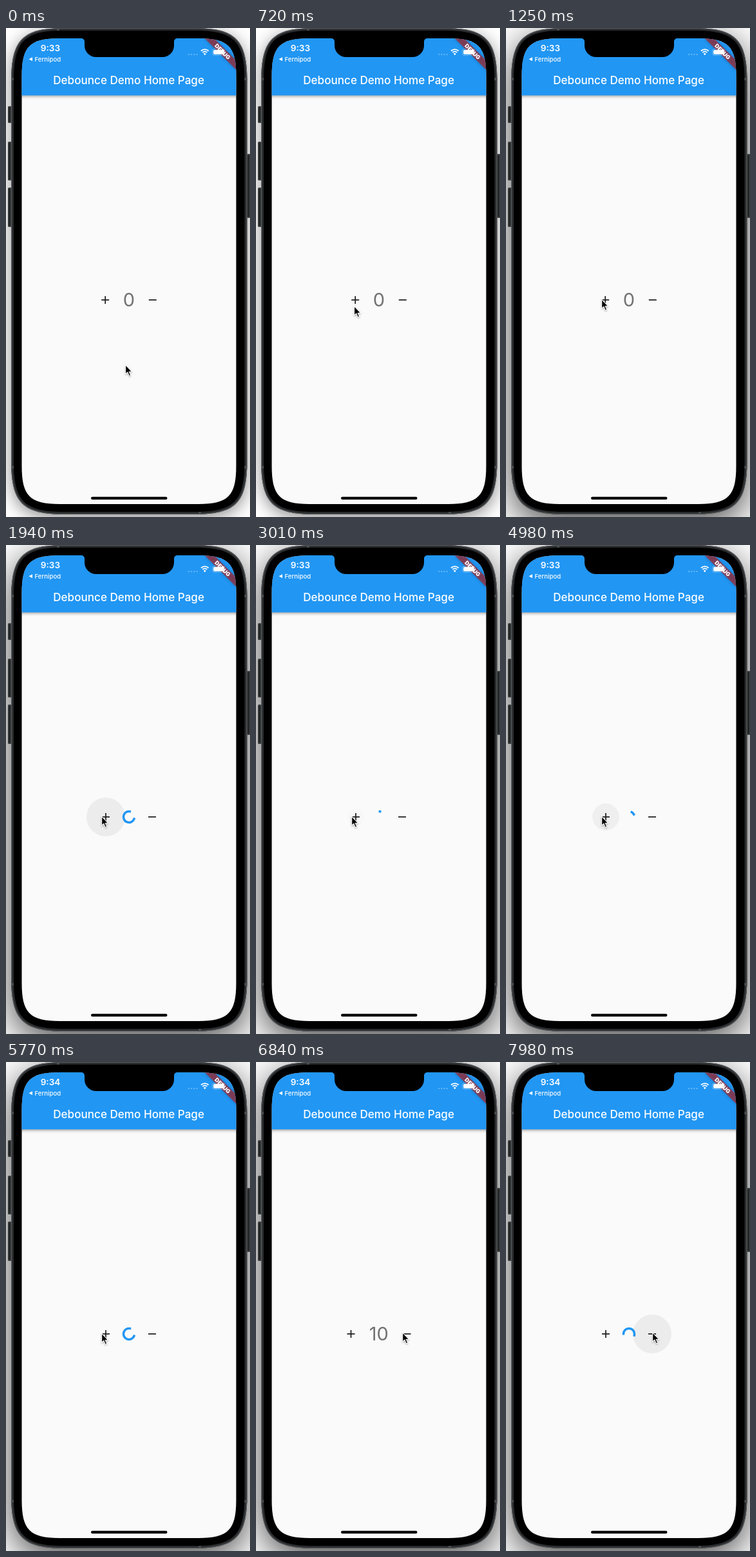
These frames come from a looping animation (379 px wide and 757 px high, 8 s). An HTML page with a canvas:

```html
<!DOCTYPE html>
<html lang="en">
<head>
<meta charset="utf-8">
<title>Counter demo</title>
<style>
  html, body { margin: 0; width: 100%; height: 100%; overflow: hidden; background: #fff; }
  canvas { display: block; width: 379px; height: 757px; }
</style>
</head>
<body>
<canvas id="stage"></canvas>
<script>
const W = 379, H = 757, LOOP = 8000, STEP = 89;
const TAU = Math.PI * 2, UI = 'Inter, "Open Sans", sans-serif', BLUE = '#2196f3';
const canvas = document.getElementById('stage');
const ctx = canvas.getContext('2d');
const dpr = window.devicePixelRatio || 1;
canvas.width = W * dpr;
canvas.height = H * dpr;

const RUNS = [0, 90, 1250, 1490, 3010, 4890, 6030, 7190];
// What the counter shows from each moment on; null means loading.
const COUNTER = [
  [0, '0'], [1450, null], [2555, '3'], [2970, null], [3335, '4'], [3425, null],
  [4435, '6'], [4850, null], [5220, '7'], [5290, null], [5855, '9'], [6030, '10'], [7145, null]
];
const PRESSES = [
  { from: 1450, to: 2080, side: 'plus' },
  { from: 2970, to: 3640, side: 'plus' },
  { from: 4850, to: 5450, side: 'plus' },
  { from: 7145, to: 8100, side: 'minus' }
];

const clamp = v => Math.min(1, Math.max(0, v));
const mix = (a, b, k) => a + (b - a) * k;
const smooth = v => { const k = clamp(v); return k * k * (3 - 2 * k); };
const latest = (list, t, key) => list.filter(e => key(e) <= t).pop();

// Cubic bezier easing (0.4, 0, 0.2, 1).
function fastOutSlowIn(x) {
  x = clamp(x);
  let lo = 0, hi = 1;
  for (let i = 0; i < 18; i++) {
    const s = (lo + hi) / 2;
    const bx = 1.2 * s * (1 - s) ** 2 + 0.6 * s * s * (1 - s) + s ** 3;
    if (bx < x) lo = s; else hi = s;
  }
  return 3 * lo * lo - 2 * lo ** 3;
}

function stepped(t) {
  const start = latest(RUNS, t, s => s);
  return start + Math.max(0, Math.floor((t - start + 12) / STEP)) * STEP;
}

function roundRect(x, y, w, h, r, fill) {
  ctx.beginPath();
  ctx.roundRect(x, y, w, h, r);
  if (fill) {
    ctx.fillStyle = fill;
    ctx.fill();
  }
}

// A rectangle whose corners blend gradually into its sides.
function softRect(x, y, w, h, r, fill) {
  const e = r * 1.43, n = e * 0.213, right = x + w, bottom = y + h;
  ctx.beginPath();
  ctx.moveTo(x + e, y);
  ctx.lineTo(right - e, y);
  ctx.bezierCurveTo(right - n, y, right, y + n, right, y + e);
  ctx.lineTo(right, bottom - e);
  ctx.bezierCurveTo(right, bottom - n, right - n, bottom, right - e, bottom);
  ctx.lineTo(x + e, bottom);
  ctx.bezierCurveTo(x + n, bottom, x, bottom - n, x, bottom - e);
  ctx.lineTo(x, y + e);
  ctx.bezierCurveTo(x, y + n, x + n, y, x + e, y);
  ctx.fillStyle = fill;
  ctx.fill();
}

function circle(x, y, r, fill) {
  ctx.beginPath();
  ctx.arc(x, y, r, 0, TAU);
  ctx.fillStyle = fill;
  ctx.fill();
}

function polygon(points, fill) {
  ctx.beginPath();
  points.forEach(([x, y]) => ctx.lineTo(x, y));
  ctx.closePath();
  ctx.fillStyle = fill;
  ctx.fill();
}

function text(str, x, y, size, weight, fill, align = 'center') {
  ctx.font = `${weight} ${size}px ${UI}`;
  ctx.textAlign = align;
  ctx.textBaseline = 'alphabetic';
  ctx.fillStyle = fill;
  ctx.fillText(str, x, y);
}

function drawPhone(focused) {
  ctx.fillStyle = '#fff';
  ctx.fillRect(0, 0, W, H);
  ctx.save();
  ctx.shadowColor = focused ? 'rgba(0,0,0,.7)' : 'rgba(0,0,0,.45)';
  ctx.shadowBlur = (focused ? 54 : 26) * dpr;
  ctx.shadowOffsetY = (focused ? 15 : 6) * dpr;
  softRect(8, 0, 366.5, 753, 58, '#000');
  ctx.restore();

  for (const [x, y, h] of [[3, 121, 26], [3, 176, 60], [3, 247, 61], [374, 195, 99]]) {
    roundRect(x, y, 5.5, h, 1.5, '#3a3d3f');
    ctx.fillStyle = '#1c1e1f';
    ctx.fillRect(x + 1.5, y + 2, 2, h - 4);
  }
  softRect(8, 0, 366.5, 753, 58, '#55585a');
  softRect(9.2, 1.2, 364.1, 750.6, 57, '#292b2d');
  softRect(12, 4, 358.5, 745, 54, '#000');
  ctx.fillStyle = '#4a4d4f';
  for (const y of [77, 678]) {
    ctx.fillRect(8, y, 4, 4);
    ctx.fillRect(370.5, y, 4, 4);
  }
  ctx.fillRect(79, 0, 4, 4);
  ctx.fillRect(299, 749, 4, 4);
}

function drawBanner() {
  ctx.save();
  ctx.translate(357, 16);
  ctx.rotate(Math.PI / 4);
  ctx.fillStyle = 'rgba(183,28,28,.63)';
  ctx.shadowColor = 'rgba(0,0,0,.4)';
  ctx.shadowBlur = 5 * dpr;
  ctx.fillRect(-34.2, 23.9, 68.4, 10.3);
  ctx.shadowColor = 'transparent';
  text('DEBUG', 0, 32.2, 8.7, 900, '#fff');
  ctx.restore();
}

function drawStatus(t) {
  text(t < 5240 ? '9:33' : '9:34', 69, 36, 13.6, 600, '#fff');
  polygon([[35.5, 48.2], [41, 45.2], [41, 51.2]], '#fff');
  text('Fernipod', 44.5, 51.6, 9.6, 500, '#fff', 'left');
  for (let i = 0; i < 4; i++) circle(284 + i * 4.2, 41, 1.1, 'rgba(255,255,255,.38)');

  ctx.strokeStyle = '#fff';
  ctx.lineWidth = 1.8;
  for (const r of [5, 8.2]) {
    ctx.beginPath();
    ctx.arc(308.8, 41.3, r, Math.PI * 1.25, Math.PI * 1.75);
    ctx.stroke();
  }
  polygon([[308.8, 42.2], [306.7, 39.7], [308.8, 38.8], [310.9, 39.7]], '#fff');

  ctx.lineWidth = 0.8;
  ctx.strokeStyle = 'rgba(255,255,255,.45)';
  roundRect(320.8, 32.6, 19.2, 9.6, 2.8);
  ctx.stroke();
  roundRect(322.2, 34, 16.4, 6.8, 1.7, '#fff');
}

function drawNotch() {
  ctx.beginPath();
  ctx.moveTo(117, 15);
  ctx.lineTo(117, 16);
  ctx.arcTo(122, 16, 122, 21, 5);
  ctx.arcTo(122, 45, 140, 45, 18);
  ctx.arcTo(261, 45, 261, 27, 18);
  ctx.arcTo(261, 16, 266, 16, 5);
  ctx.lineTo(266, 15);
  ctx.fillStyle = '#000';
  ctx.fill();
}

function drawSpinner(age) {
  const p = age / 1333 % 1;
  const head = fastOutSlowIn(p * 2), tail = fastOutSlowIn(p * 2 - 1);
  const start = -Math.PI / 2 + tail * 1.5 * Math.PI + age / 2222 * TAU + p * Math.PI / 2;
  ctx.beginPath();
  ctx.arc(191, 421, 8.55, start, start + Math.max((head - tail) * 1.5 * Math.PI, 0.001));
  ctx.strokeStyle = BLUE;
  ctx.lineWidth = 3.5;
  ctx.lineCap = 'square';
  ctx.stroke();
  ctx.lineCap = 'butt';
}

function drawCounter(t) {
  const [since, value] = latest(COUNTER, t, e => e[0]);
  const reach = value === null ? 36 : value.length > 1 ? 43.5 : 36.8;
  const x = { plus: 191 - reach, minus: 191 + reach };

  for (const { from, to, side } of PRESSES) {
    const strength = smooth((t - from) / 180) * (1 - smooth((t - to) / 260));
    if (strength > 0) {
      const r = mix(12, 30, smooth((t - from) / 260));
      circle(x[side], 421, r, `rgba(0,0,0,${0.053 * strength})`);
    }
  }
  ctx.fillStyle = '#1c1c1c';
  ctx.fillRect(x.plus - 6, 420.1, 12, 1.7);
  ctx.fillRect(x.plus - 0.85, 415, 1.7, 12);
  ctx.fillRect(x.minus - 6, 420.1, 12, 1.7);

  if (value === null) drawSpinner(t - since);
  else text(value, 190.8, 431, 29, 400, '#737373');
}

function drawScreen(t) {
  ctx.save();
  softRect(24.5, 16, 333, 721, 41, '#fafafa');
  ctx.clip();
  ctx.save();
  ctx.shadowColor = 'rgba(0,0,0,.42)';
  ctx.shadowBlur = 5 * dpr;
  ctx.shadowOffsetY = 1.6 * dpr;
  ctx.fillStyle = BLUE;
  ctx.fillRect(20, 10, 342, 94.3);
  ctx.restore();
  text('Debounce Demo Home Page', 190.6, 86.6, 17.1, 500, '#fff');
  drawCounter(t);
  drawBanner();
  drawStatus(t);
  drawNotch();
  roundRect(132, 725.8, 118.5, 4.3, 2.2, '#000');
  ctx.restore();
}

function cursorAt(t) {
  if (t < 6030) {
    const k = smooth((t - 10) / 880);
    return [mix(185.6, 148.6, k), mix(521.6, 420, k)];
  }
  const k = smooth((t - 5980) / 850);
  return [mix(148.6, 227.6, k), mix(420, 418.8, k) + 6 * Math.sin(Math.PI * k)];
}

function drawCursor(t) {
  const [x, y] = cursorAt(t);
  ctx.save();
  ctx.translate(x, y);
  ctx.shadowColor = 'rgba(0,0,0,.35)';
  ctx.shadowBlur = 2.5 * dpr;
  ctx.shadowOffsetY = dpr;
  polygon([[-0.4, -0.9], [-0.4, 15.4], [3.1, 12.2], [5.7, 17.9], [8.7, 16.6], [6.3, 11.2], [11.2, 11]], '#fff');
  ctx.shadowColor = 'transparent';
  polygon([[0.6, 1.4], [0.6, 13], [3.4, 10.4], [6.1, 16.4], [7.4, 15.8], [4.9, 10.2], [8.8, 9.9]], '#000');
  ctx.restore();
}

let shown = -1;
function frame(now) {
  const t = stepped(now % LOOP);
  if (t !== shown) {
    shown = t;
    ctx.setTransform(dpr, 0, 0, dpr, 0, 0);
    drawPhone(t >= 1250);
    drawScreen(t);
    drawCursor(t);
  }
  requestAnimationFrame(frame);
}
requestAnimationFrame(frame);
</script>
</body>
</html>
```
